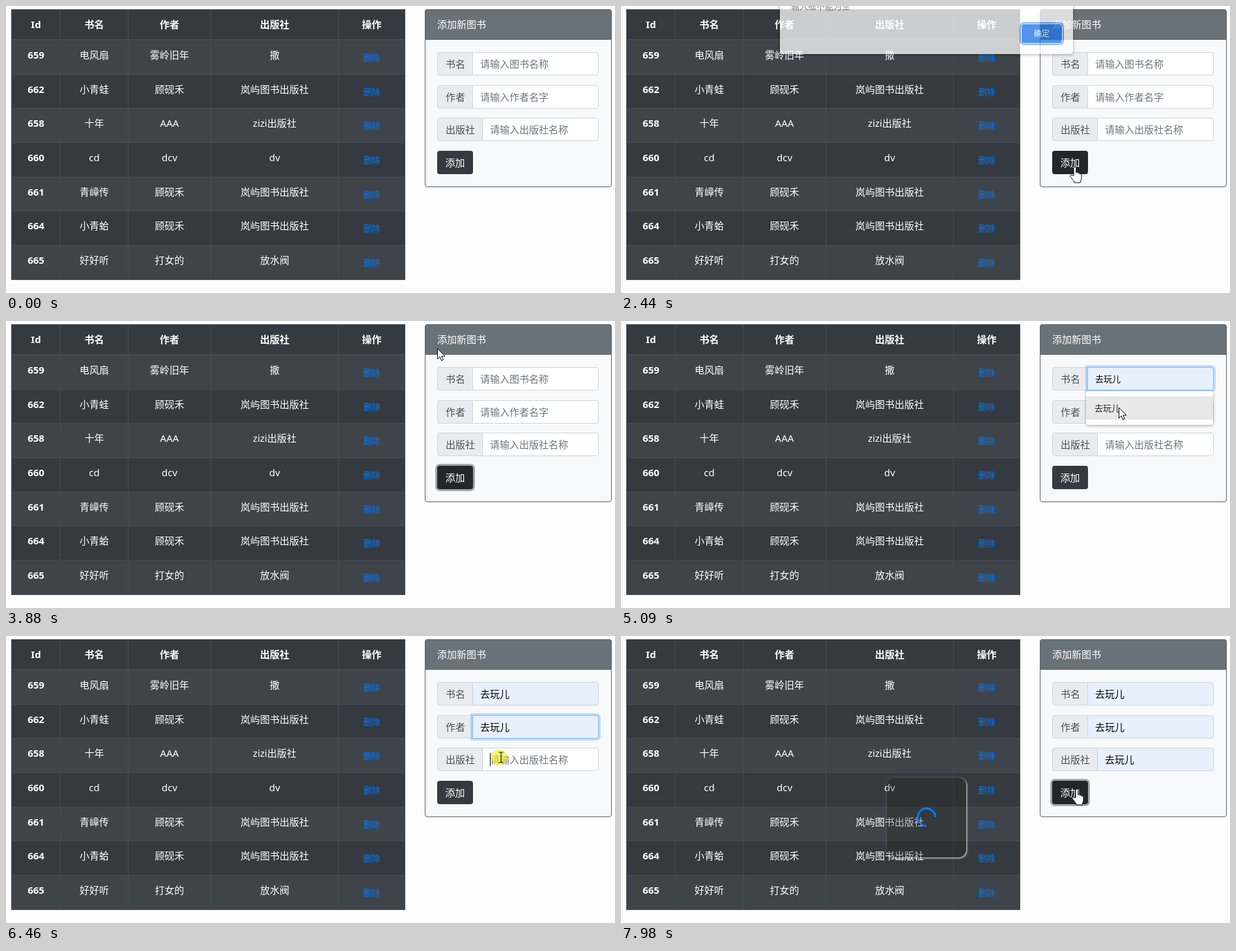
An HTML page that plays this animation: 935x442 px, repeating every 8 s.

```html
<!DOCTYPE html>
<html lang="zh-CN">
<head>
<meta charset="utf-8">
<style>
html, body { margin: 0; width: 100%; height: 100%; overflow: hidden; background: #fdfdfd; }
#stage { position: absolute; left: 0; top: 0; width: 935px; height: 442px; overflow: hidden;
  font: 15px "Noto Sans", "Noto Sans CJK SC", "Noto Sans CJK", sans-serif; }
#stage div { position: absolute; box-sizing: border-box; white-space: nowrap; }
.table { background: #343a40; }
.stripe { background: #3e444a; }
.line { background: #454d55; }
.cell { color: #fff; font-weight: 500; text-align: center; }
.bold { font-weight: 700; }
.link { color: #007bff; font-size: 13px; font-weight: 500; text-align: center; }
.card { background: #f8f9fa; border: 1px solid #5a6168; border-radius: 4px; }
.head { background: #6a7279; border: 1px solid #5a6168; border-radius: 4px 4px 0 0; color: #fff;
  font-weight: 500; padding-left: 18px; }
.label { background: #e9ecef; border: 1px solid #ced4da; border-radius: 4px 0 0 4px; color: #495057; padding-left: 12px; }
.field { background: #fff; border: 1px solid #ced4da; border-radius: 0 4px 4px 0; color: #6c757d; padding-left: 11px; }
.field.filled { background: #e8f0fe; color: #000; }
.field.preview { font-size: 13px; }
.field.focus { border-color: #80bdff; box-shadow: 0 0 0 3px rgba(0,123,255,.25); z-index: 1; }
.caret { background: #000; z-index: 2; }
.button { background: #343a40; border-radius: 4px; color: #fff; font-weight: 500; text-align: center; }
.button.dark { background: #23272b; }
.button.ring { box-shadow: 0 0 0 3px rgba(82,88,93,.5); }
.menu { background: #fff; border-radius: 3px; box-shadow: 0 1px 4px rgba(0,0,0,.35); z-index: 3; }
.item { color: #222; font-size: 13px; padding-left: 13px; }
.item.hover { background: #e8e8e8; }
.dialog { background: #fff; border-radius: 0 0 4px 4px; box-shadow: 0 1px 5px rgba(0,0,0,.45); z-index: 4; }
.message { color: #5f6368; font-size: 13px; }
.ok { background: #1a73e8; border-radius: 4px; box-shadow: 0 0 0 1px #fff, 0 0 0 3px #5c9cf0;
  color: #fff; font-size: 12px; text-align: center; }
.ok.hover { background: #2b7de9; }
.loading { background: rgba(30,30,26,.28); border-radius: 12px; box-shadow: 1px 1px 3px rgba(255,255,255,.9); }
.spinner { border: 3px solid #007bff; border-right-color: transparent; border-radius: 50%; }
.click { background: #f4ee20; opacity: .65; border-radius: 50%; z-index: 5; }
svg { position: absolute; left: 0; top: 0; z-index: 6; }
</style>
</head>
<body>
<div id="stage">
  <svg width="935" height="442" fill="#fff" stroke="#000" stroke-linejoin="round">
    <g id="cursor">
      <path id="arrow" d="M.5 .5V16.5L4.2 13 6.7 19 9.3 17.8 6.8 12.2H12Z"/>
      <path id="hand" d="M-2 13V1.5a1.9 1.9 0 0 1 3.8 0V9c0-2 2.8-2 2.8 0v1c0-1.8 2.8-1.8 2.8 .3v1c0-1.6 2.6-1.4 2.6 .5v4.7c0 4-1.8 4.5-1.8 7.5H-1c0-3-4.5-6.5-6-9.5-1-2.5 1.5-3 2.8-1.6Z"/>
      <path id="beam" fill="none" d="M-3.5-8h2.5l1 1 1-1h2.5M0-7V7M-3.5 8h2.5l1-1 1 1h2.5"/>
    </g>
  </svg>
</div>
<script>
const stage = document.getElementById('stage');
const byId = id => document.getElementById(id);

function box(cls, x, y, w, h, text = '', parent = stage) {
  const el = document.createElement('div');
  el.className = cls;
  el.textContent = text;
  el.style.cssText = `left:${x}px;top:${y}px;width:${w}px;height:${h}px`;
  const border = /label|field|head/.test(cls) ? 2 : 0;
  if (text) el.style.lineHeight = h - border + 'px';
  parent.append(el);
  return el;
}

// Book table
const columns = [8, 83, 187, 314, 510, 612];
const books = [
  ['659', '电风扇', '雾岭旧年', '撒'],
  ['662', '小青蛙', '顾砚禾', '岚屿图书出版社'],
  ['658', '十年', 'AAA', 'zizi出版社'],
  ['660', 'cd', 'dcv', 'dv'],
  ['661', '青嶂传', '顾砚禾', '岚屿图书出版社'],
  ['664', '小青蛤', '顾砚禾', '岚屿图书出版社'],
  ['665', '好好听', '打女的', '放水阀']
];
const rowTop = i => Math.floor(52.4 + 52.7 * i);
const cell = (cls, col, centre, text) =>
  box(cls, columns[col], centre - 12, columns[col + 1] - columns[col] + 1, 24, text);

box('table', 8, 5, 605, 417);
books.forEach((_, i) => i % 2 || box('stripe', 8, rowTop(i), 605, rowTop(i + 1) - rowTop(i)));
columns.forEach(x => box('line', x, 5, 1, 417));
box('line', 8, 5, 605, 1);
box('line', 8, 51, 605, 2);
books.forEach((_, i) => box('line', 8, rowTop(i + 1), 605, 1));
['Id', '书名', '作者', '出版社', '操作'].forEach((name, c) => cell('cell bold', c, 28, name));
books.forEach((book, i) => {
  book.forEach((text, c) => cell(c ? 'cell' : 'cell bold', c, rowTop(i) + 23, text));
  cell('link', 4, rowTop(i) + 27, '删除');
});

// Form
box('card', 643, 5, 287, 274);
box('head', 643, 5, 287, 47, '添加新图书');
const entry = '去玩儿';
// Times at which each field is clicked, shows its menu and has the entry picked
const fields = [
  { label: '书名', hint: '请输入图书名称', focus: 4300, open: 4550, pick: 5240 },
  { label: '作者', hint: '请输入作者名字', focus: 5460, open: 5750, pick: 6100 },
  { label: '出版社', hint: '请输入出版社名称', focus: 6385, open: 6590, pick: 6940 }
];
const add = 2230, confirm = 3540, submit = 7705;

fields.forEach((f, i) => {
  const labelWidth = 25 + 15 * f.label.length;
  f.x = 661 + labelWidth;
  f.y = Math.round(71 + 50.5 * i);
  f.menuTop = f.y + 37;
  f.blur = fields[i + 1] ? fields[i + 1].focus + 130 : submit + 70;
  box('label', 662, f.y, labelWidth, 36, f.label);
  f.input = box('field', f.x, f.y, 910 - f.x, 36, f.hint);
  f.caret = box('caret', f.x + 12, f.y + 8, 1, 20);
  f.menu = box('menu', f.x - 2, f.menuTop, 195, 52);
  f.item = box('item', 0, 8, 195, 36, entry, f.menu);
});
const button = box('button', 662, 223, 55, 36, '添加');

// Overlays
const dialog = box('dialog', 244, -60, 450, 142);
box('message', 17, 58, 200, 20, '输入框不能为空', dialog);
const ok = box('ok', 371, 96, 62, 29, '确定', dialog);
const loading = box('loading', 408, 218, 122, 123);
const spinner = box('spinner', 46, 46, 30, 30, '', loading);
const click = box('click', 0, 0, 24, 24);

// The picture moves only within these spans, in even steps
const bursts = [
  [530, 1220], [1820, 2580], [2770, 3340], [3540, 4160], [4300, 4560],
  [4960, 5760], [5830, 6600], [6670, 7440], [7510, 7980]
];
// Cursor moves: start, end, destination
const moves = [
  [530, 1220, 779.5, 93], [1820, 2235, 697, 248], [2770, 3340, 650, 50],
  [3610, 3884, 662, 42], [3884, 4160, 743, 92], [4960, 5105, 764, 133],
  [5830, 5970, 760, 187], [6670, 6810, 762, 236], [7440, 7645, 700, 236]
];
const clicks = [add, confirm, submit, ...fields.flatMap(f => [f.focus, f.pick])];

const within = (t, from, to) => t >= from && t < to;
const inside = (x, y, left, top, right, bottom) => within(x, left, right) && within(y, top, bottom);
const progress = (t, from, duration) => Math.min(1, Math.max(0, (t - from) / duration));
const easeOut = k => 1 - (1 - k) ** 2;
const easeInOut = k => k * k * (3 - 2 * k);
const show = (el, on) => el.style.display = on ? '' : 'none';

function snap(t) {
  const burst = bursts.findLast(([from]) => t >= from);
  if (!burst) return 0;
  const [from, to] = burst;
  const step = (to - from) / Math.round((to - from) / 70);
  return Math.min(to, from + Math.floor((t - from) / step + .22) * step);
}

function cursorAt(t) {
  let x = 893, y = 415;
  for (const [from, to, toX, toY] of moves) {
    const k = easeInOut(progress(t, from, to - from));
    x += (toX - x) * k;
    y += (toY - y) * k;
  }
  return [x, y];
}

function cursorKind(x, y, open, dialogOpen) {
  if (dialogOpen && y < 82 || open && y >= open.menuTop) return 'arrow';
  if (inside(x, y, 662, 223, 717, 259)) return 'hand';
  return fields.some(f => inside(x, y, f.x, f.y, 910, f.y + 36)) ? 'beam' : 'arrow';
}

function render(time) {
  const t = snap(time);
  const [x, y] = cursorAt(t);
  const open = fields.find(f => within(t, f.open, f.pick + 70));

  for (const f of fields) {
    const hover = f === open && inside(x, y, f.x, f.menuTop + 8, 910, f.menuTop + 44);
    const filled = hover || t >= f.pick + 70;
    f.input.textContent = filled ? entry : f.hint;
    f.input.classList.toggle('filled', filled);
    f.input.classList.toggle('preview', hover);
    f.input.classList.toggle('focus', within(t, f.focus + 130, f.blur));
    f.item.classList.toggle('hover', hover);
    show(f.menu, f === open);
    show(f.caret, !filled && within(t, f.focus + 70, f.blur));
  }
  const firstFocus = fields[0].focus;
  button.classList.toggle('dark', within(t, add, firstFocus) || t >= submit - 70);
  button.classList.toggle('ring', within(t, confirm + 200, firstFocus) || t >= submit + 70);

  const opened = easeOut(progress(t, add + 75, 275));
  const closed = progress(t, confirm + 70, 200);
  const dialogOpen = opened > 0 && closed < 1;
  show(dialog, dialogOpen);
  dialog.style.opacity = opened * (1 - closed);
  dialog.style.transform = `translateY(${32 * (opened - 1)}px)`;
  ok.classList.toggle('hover', dialogOpen && y < 65);

  loading.style.opacity = progress(t, submit + 70, 140);
  spinner.style.transform = `rotate(${45 + (t - 7980) * .48}deg)`;

  show(click, clicks.some(c => within(t, c, c + 140)));
  click.style.transform = `translate(${x - 15}px, ${y - 12}px)`;

  const cursor = byId('cursor');
  show(cursor, t >= 530);
  cursor.setAttribute('transform', `translate(${x} ${y})`);
  const kind = cursorKind(x, y, open, dialogOpen);
  for (const name of ['arrow', 'hand', 'beam']) show(byId(name), name === kind);
}

const start = performance.now();
function tick() {
  render((performance.now() - start) % 8000);
  requestAnimationFrame(tick);
}
tick();
</script>
</body>
</html>
```
